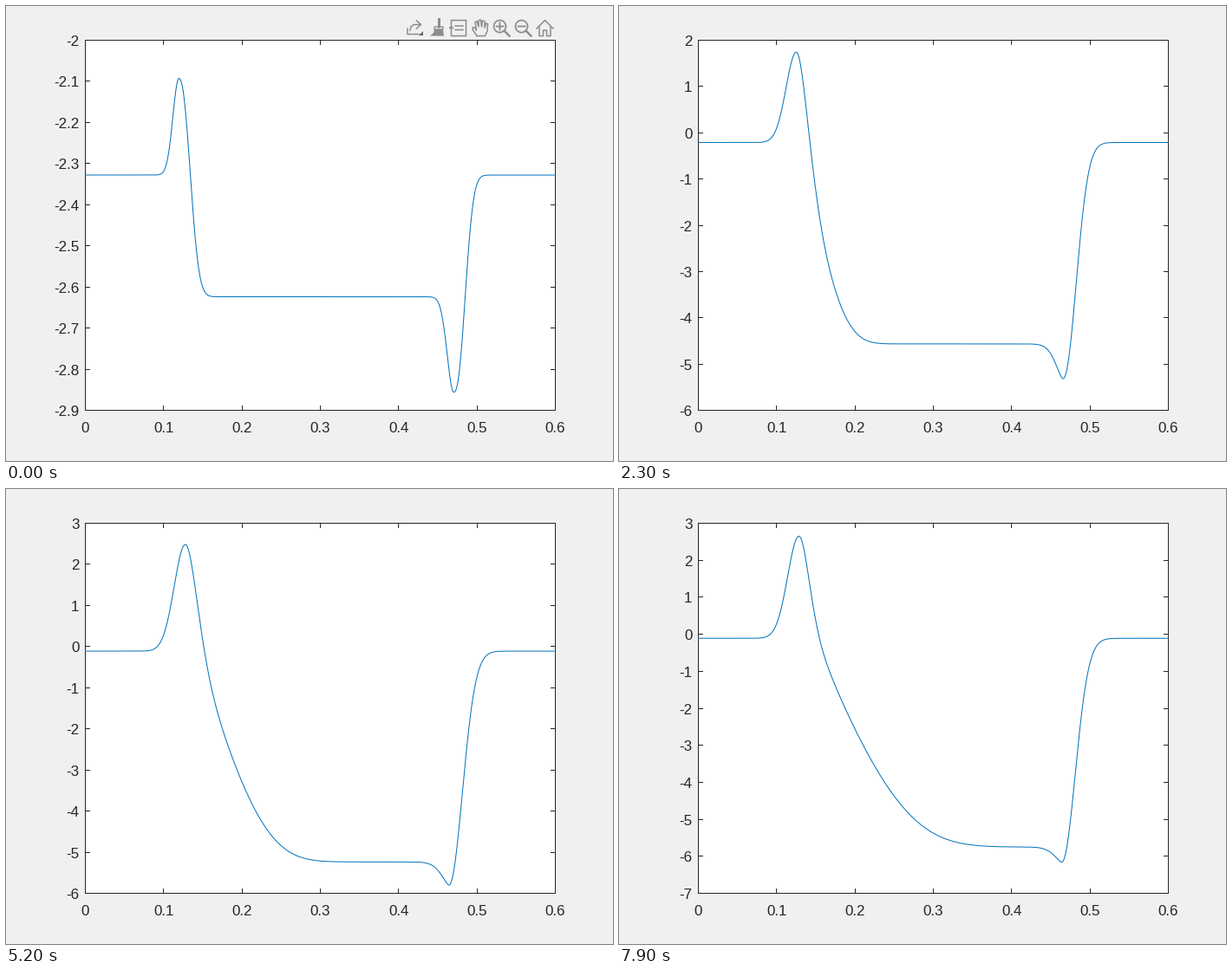
These frames come from a looping animation (700 by 525 pixels, 8000 ms). A matplotlib script:

```python
import numpy as np
import matplotlib.pyplot as plt
from matplotlib.animation import FuncAnimation
from matplotlib.collections import LineCollection
from matplotlib.patches import Circle, Polygon, Rectangle

W, H, DPI = 700, 525, 100
FRAMES, STEP_MS = 80, 100
LEFT, RIGHT, TOP, BOTTOM = 91.5, 633.5, 39.5, 466.5
PX = 72 / DPI
INK, GREY, BLUE = "#262626", "#8c8c8c", "#0072bd"


def decay(t, rate):
    return np.exp(-rate * t)


def bell(d, width, power=2):
    return np.exp(-(np.abs(d) / width) ** power)


def levels(t):
    """Outer plateau, peak, inner plateau and dip at time t in seconds."""
    outer = -.1 - 2.227 * decay(t, 1.335)
    peak = 2.7 + .002 * t - 1.832 * decay(t, 2.04) - 2.96 * decay(t, .5)
    inner = -4.087 - .24 * t + .0039 * t * t + 1.464 * decay(t, 1.38)
    dip = (inner - .853 + .056 * t + .621 * decay(t, 4)
           - .25 * t * decay(t, 1.3))
    return outer, peak, inner, dip


def flank(d, t):
    """Fall from the peak (1) to the inner plateau (0), spreading with time."""
    d = np.maximum(d, 0)
    z = (np.hypot(d, 10) - 10) / (32 + 19.2 * t)
    knee = (.25 + .8 * decay(t, .6)) * (1 - bell(d, 32 - 1.8 * t))
    late = knee + 2.15 * z + 2.33 * z ** 3
    start = decay(t, 3)
    return np.exp(-start * (d / 16.7) ** 2.3 - (1 - start) * late)


def profile(t):
    outer, peak, inner, dip = levels(t)
    early = decay(t, .7)
    x = np.arange(LEFT, RIGHT + .25, .5)
    a = x - (207.9 - 8.5 * decay(t, .4))
    b = x - (510.6 + 5.8 * decay(t, .6))
    rise = outer + (peak - outer) * bell(a, 18.5 - 8.7 * early)
    middle = (inner + (peak - inner) * flank(a, t)
              + (dip - inner) * bell(b, 12.7 - 2 * early, 1.5 + .5 * early))
    climb = outer + (dip - outer) * bell(b, 21.9 - 5.4 * early, 2 + .4 * early)
    return x, np.where(a < 0, rise, np.where(b < 0, middle, climb))


def auto_ticks(lo, hi):
    """Smallest round step that needs at most ten intervals."""
    for step in (.1, .2, .5, 1):
        a, b = int(np.floor(lo / step)), int(np.ceil(hi / step))
        if b - a <= 10:
            break
    return [round(i * step, 1) + 0.0 for i in range(a, b + 1)]


plt.rcParams["font.family"] = "Liberation Sans"
plt.rcParams["path.snap"] = False
fig = plt.figure(figsize=(W / DPI, H / DPI), dpi=DPI, facecolor="#f0f0f0")
ax = fig.add_axes([0, 0, 1, 1])
ax.set_xlim(0, W)
ax.set_ylim(H, 0)
ax.axis("off")


def frame_box(**style):
    ax.add_patch(Rectangle((LEFT, TOP), RIGHT - LEFT, BOTTOM - TOP, **style))


def label(x, y, s, ha):
    return ax.text(x, y, s, ha=ha, va="baseline", size=17 * PX, color=INK)


def tick_lines(segs):
    return ax.add_collection(
        LineCollection(segs, colors=INK, linewidths=PX, zorder=2))


def pixel_center(v):
    return np.floor(v + 1e-6) + .5


frame_box(fc="white", ec="none", zorder=0)
frame_box(fc="none", ec=INK, lw=PX, zorder=2)

x_segs = []
for i in range(7):
    x = LEFT + (RIGHT - LEFT) * i / 6
    col = pixel_center(x)
    x_segs += [[(col, BOTTOM - 5.5), (col, BOTTOM)],
               [(col, TOP), (col, TOP + 5.5)]]
    label(x, 491.5, f"{i / 10:g}", "center")
tick_lines(x_segs)
y_ticks = tick_lines([])
y_labels = [label(84.5, 0, "", "right") for _ in range(11)]
curve, = ax.plot([], [], color=BLUE, lw=PX, zorder=3)

toolbar = []


def stroke(*pts, lw=1.5):
    toolbar.extend(ax.plot(*zip(*pts), color=GREY, lw=lw * PX,
                           solid_joinstyle="round"))


def shape(patch):
    toolbar.append(ax.add_patch(patch))


def magnifier(x, plus):
    shape(Circle((x, 23.5), 7, fc="none", ec=GREY, lw=1.7 * PX))
    stroke((x + 5, 28.5), (x + 11, 34.5), lw=2.4)
    stroke((x - 4, 23.5), (x + 4, 23.5), lw=1.8)
    if plus:
        stroke((x, 19.5), (x, 27.5), lw=1.8)


# export
stroke((463, 26), (463, 32.5), (476, 32.5))
stroke((466, 28), (467, 24), (470, 21.5), (477, 21.5))
stroke((473.5, 17), (478.5, 21.5), (473.5, 26))
shape(Polygon([(476, 34), (481, 34), (481, 29)], fc="#666666", ec="none"))
# brush
stroke((499.5, 15.5), (499.5, 24), lw=3)
shape(Rectangle((494, 24), 10, 3, fc="none", ec=GREY, lw=1.3 * PX))
shape(Polygon([(494, 27), (504, 27), (505, 34.5), (489, 34.5), (493, 31)],
              fc=GREY, ec="none"))
# data tip
shape(Rectangle((513.5, 16.5), 17, 18, fc="none", ec=GREY, lw=1.5 * PX))
stroke((518, 23), (527, 23))
stroke((518, 27.5), (527, 27.5))
stroke((512, 25.2), (515, 25.2), lw=2)
# hand
stroke((543, 34.5), (538, 27), (538.5, 24.5), (541, 25.5), (542.5, 28),
       (541, 18.5), (543, 17.5), (545, 24), (545, 16.5), (547.5, 16),
       (548.5, 24), (549.5, 17), (552, 17.5), (552, 25), (553.5, 20),
       (555.5, 20.5), (555, 29), (552.5, 34.5), (543, 34.5))
# zoom in, zoom out
magnifier(569.5, True)
magnifier(594.5, False)
# home
stroke((612, 26), (621.5, 16.5), (631, 26))
stroke((615, 24), (615, 34.5), (619.5, 34.5), (619.5, 28), (623.5, 28),
       (623.5, 34.5), (628, 34.5), (628, 24))


def draw(i):
    t = i * STEP_MS / 1000
    _, peak, _, dip = levels(t)
    ticks = auto_ticks(dip, peak)
    lo, hi = ticks[0], ticks[-1]

    def to_px(v):
        return BOTTOM - (v - lo) / (hi - lo) * (BOTTOM - TOP)

    segs = []
    for n, txt in enumerate(y_labels):
        txt.set_visible(n < len(ticks))
        if n < len(ticks):
            y = to_px(ticks[n])
            row = pixel_center(y)
            segs += [[(LEFT, row), (LEFT + 5.5, row)],
                     [(RIGHT - 5.5, row), (RIGHT, row)]]
            txt.set_text(f"{ticks[n]:g}")
            txt.set_y(y + 6.5)
    y_ticks.set_segments(segs)
    x, e = profile(t)
    curve.set_data(x, to_px(e) + .4)
    for part in toolbar:
        part.set_visible(i == 0)
    return [curve, y_ticks, *y_labels, *toolbar]


anim = FuncAnimation(fig, draw, frames=FRAMES, interval=STEP_MS,
                     blit=False, repeat=True)
plt.show()
```
